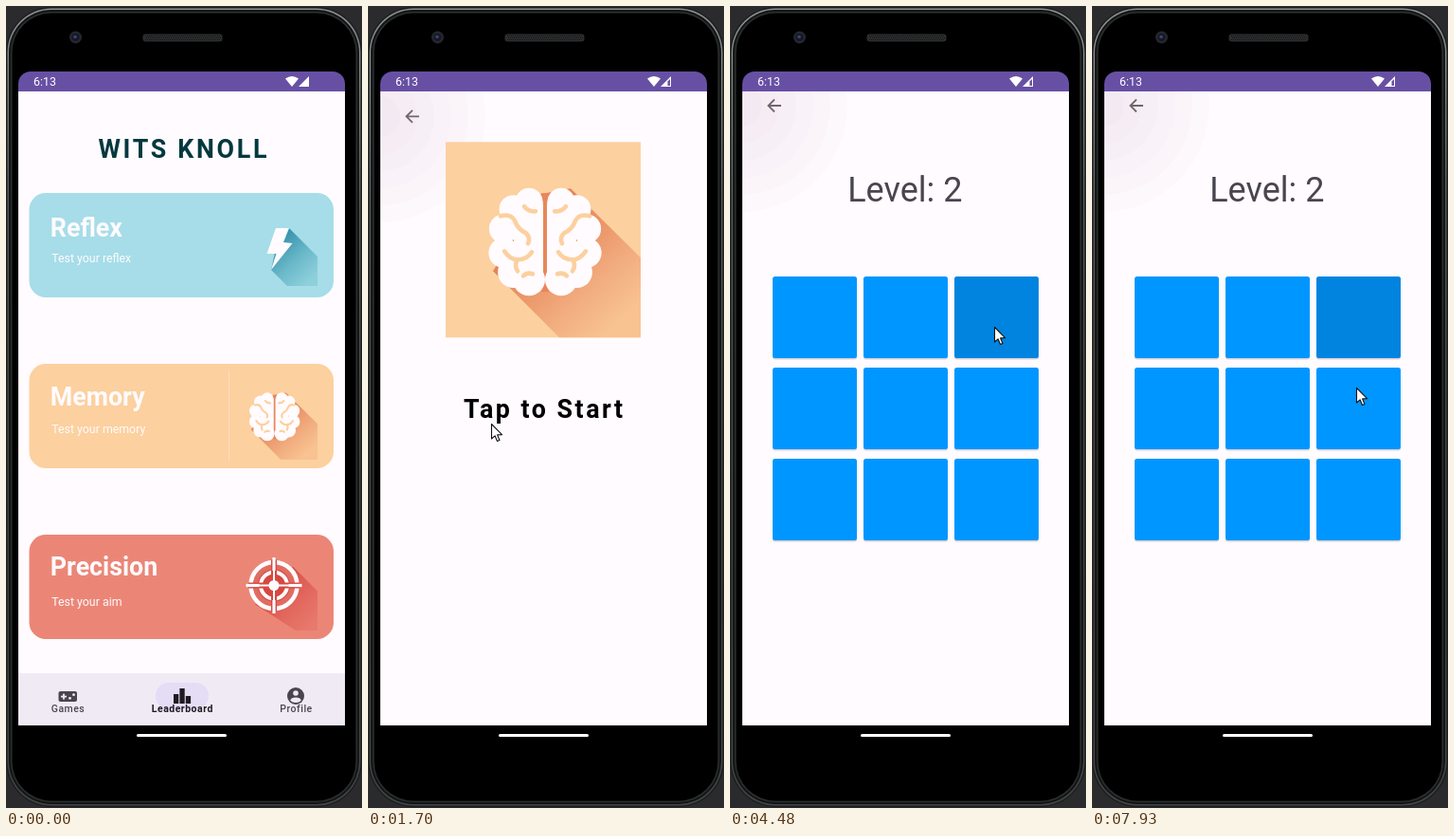
Animation, 376 px wide and 845 px high, one loop 7990 ms. Source, as an HTML page with a canvas:

```html
<!DOCTYPE html>
<html lang="en">
<head>
<meta charset="utf-8">
<title>Memory game demo</title>
<style>
html, body { margin: 0; width: 100%; height: 100%; overflow: hidden; background: #2b2b2d; }
canvas { display: block; width: 376px; height: 845px; }
</style>
</head>
<body>
<canvas id="stage"></canvas>
<script>
const W = 376, H = 845, LOOP = 7990, BEAT = 57;
const canvas = document.getElementById('stage');
const c = canvas.getContext('2d');
const dpr = window.devicePixelRatio || 1;
canvas.width = W * dpr;
canvas.height = H * dpr;

const PAPER = '#fffbfe', GREY = '#49454f', INK = '#1d1b20', PURPLE = '#6750a4', NAV = '#f0eaf5';
const PEACH = '#fcd09f', BLUE = '#0096ff', OLIVE = '#697a21', RED = '#d5483f';

// Pointer paths: each starts where the previous one ended
const START = [37, 494];
const MOVES = [
  { from: 460, to: 620, at: [130, 440] },
  { from: 2175, to: 2340, at: [132, 452] },
  { from: 3715, to: 3770, at: [145, 438] },
  { from: 3770, to: 4120, at: [279, 338] },
  { from: 7750, to: 7930, at: [279, 402] },
];
const FLASHES = [{ from: 2900, to: 3830, tile: 2 }, { from: 5350, to: 6100, tile: 2 }, { from: 6460, to: 7240, tile: 5 }];
const PRESSES = [{ from: 4370, to: 4930 }, { from: 7750, to: LOOP }];

const during = (spans, t) => spans.find(s => t >= s.from && t < s.to);
const clamp = v => Math.min(1, Math.max(0, v));
const easeOut = p => 1 - (1 - p) ** 2;

const held = (t, start) => start + Math.floor((t - start) / 55) * 55;

function stepped(t, { from, to }) {
  const n = Math.round((to - from) / BEAT);
  return Math.floor(clamp((t - from) / (to - from)) * n) / n;
}

function rect(x, y, w, h, r, fill) {
  c.beginPath();
  c.roundRect(x, y, w, h, r);
  c.fillStyle = fill;
  c.fill();
}

function disc(x, y, r, fill) {
  c.beginPath();
  c.arc(x, y, r, 0, 7);
  c.fillStyle = fill;
  c.fill();
}

function ring(x, y, r, width, color) {
  c.beginPath();
  c.arc(x, y, r, 0, 7);
  c.lineWidth = width;
  c.strokeStyle = color;
  c.stroke();
}

function poly(points, fill) {
  c.beginPath();
  points.forEach(p => c.lineTo(p[0], p[1]));
  c.closePath();
  c.fillStyle = fill;
  c.fill();
}

function text(str, x, y, size, weight, color, spacing = 0, align = 'left') {
  c.font = `${weight} ${size}px Roboto, sans-serif`;
  c.letterSpacing = spacing + 'px';
  c.textAlign = align;
  c.fillStyle = color;
  c.fillText(str, x, y);
}

function fade(x0, y0, x1, y1, ...colors) {
  const g = c.createLinearGradient(x0, y0, x1, y1);
  colors.forEach((color, i) => g.addColorStop(i / (colors.length - 1), color));
  return g;
}

function scoped(draw) {
  c.save();
  draw();
  c.restore();
}

function clipped(x, y, w, h, r, draw) {
  scoped(() => {
    c.beginPath();
    c.roundRect(x, y, w, h, r);
    c.clip();
    draw();
  });
}

function shell(inset, color) {
  rect(inset, inset + 1, W - 2 * inset, H - 2 * inset - 2, 48 - inset, color);
}

function phone() {
  c.fillStyle = '#2b2b2d';
  c.fillRect(0, 0, W, H);
  shell(0, '#1c1e1e');
  shell(1.5, fade(0, 0, 0, H, '#8e9393', '#525657', '#424546', '#3a3d3e', '#424647'));
  shell(3, '#141616');
  shell(5, '#2c2f2f');
  shell(6.5, '#000');
  disc(73.5, 33, 6.5, '#25272b');
  disc(73.5, 33, 4, '#15182a');
  disc(73, 32.5, 1.8, '#3a466e');
  rect(144.5, 29.5, 84, 8, 3, '#2c2d2e');
  c.fillStyle = '#121313';
  for (let i = 0; i < 40; i++)
    for (let j = 0; j < 3; j++) c.fillRect(147 + i * 2 + j % 2, 31 + j * 2, 1, 1);
  rect(138, 767, 95, 3, 1.5, '#fff');
}

function statusBar(t) {
  c.fillStyle = PURPLE;
  c.fillRect(13, 69, 345, 21);
  text('6:13', 29, 84.2, 12.4, 400, '#fff');
  c.beginPath();
  c.moveTo(302, 85);
  c.lineTo(295, 76.5);
  c.quadraticCurveTo(302, 71.5, 309, 76.5);
  c.fillStyle = '#fff';
  c.fill();
  poly([[320, 74], [320, 85], [309, 85]], '#fff');
  if (t >= 1700) poly([[319, 77], [319, 84], [316.5, 84], [316.5, 79.5]], PURPLE);
}

function bolt() {
  poly([[299, 234], [329, 264], [329, 295], [297, 295], [280, 278], [285, 255]],
    fade(287, 250, 322, 288, '#3c96af', '#6ab8c9', '#8dcfdb'));
  poly([[285, 234], [299, 234], [293, 249], [302.5, 250], [280, 278], [285.5, 261], [275.5, 261]], PAPER);
}

function hemisphere() {
  for (let i = 0; i < 6; i++) {
    const a = -Math.PI * (0.5 + i / 5);
    disc(88 + 28 * Math.cos(a), 104 + 41 * Math.sin(a), 14.5 + i / 2, PAPER);
  }
  rect(72, 52, 31, 109, 15, PAPER);
  c.strokeStyle = PEACH;
  c.lineWidth = 4.6;
  c.lineCap = 'round';
  c.stroke(new Path2D('M58 78q11-3 15 5q3 9 12 13q5 5 2 11M83 68q5 6 12 5M62 115q6 9 14 9q10 0 15-8M76 124q-4 6 0 12M82 141q4-4 10-2'));
}

// Brain picture on a 206-unit square
function brain(x, y, size) {
  scoped(() => {
    c.translate(x, y);
    c.scale(size / 206, size / 206);
    c.fillStyle = PEACH;
    c.fillRect(0, 0, 206, 206);
    poly([[132, 49], [206, 122], [206, 206], [120, 206], [50, 136], [100, 55]],
      fade(100, 90, 186, 186, '#e58458', '#eb9669', '#f2ae80', '#f8c291'));
    c.fillStyle = '#e8875b';
    c.fillRect(101, 54, 8, 104);
    hemisphere();
    c.translate(210, 0);
    c.scale(-1, 1);
    hemisphere();
  });
}

function target() {
  scoped(() => {
    c.translate(283, 610.5);
    poly([[20, -20], [46, 6], [46, 47.5], [23, 47.5], [-20, 20]],
      fade(2, 2, 42, 42, '#d9524a', '#e2685d', '#e87a6c'));
    disc(0, 0, 24, '#e06c60');
    ring(0, 0, 24.5, 4.5, PAPER);
    disc(0, 0, 17, RED);
    ring(0, 0, 14, 4, PAPER);
    disc(0, 0, 5.5, PAPER);
    for (let i = 0; i < 4; i++) {
      c.rotate(Math.PI / 2);
      c.fillStyle = RED;
      c.fillRect(-3, -27, 6, 16);
      c.fillStyle = PAPER;
      c.fillRect(-1.6, -29.5, 3.2, 14);
      c.fillRect(-1, -16, 2, 13);
    }
  });
}

function navBar() {
  c.fillStyle = NAV;
  c.fillRect(0, 703, W, 55);
  rect(158, 713, 56, 28, 14, '#e5dcf6');
  rect(55.5, 722, 19.5, 11, 2, GREY);
  c.fillStyle = NAV;
  c.fillRect(58, 726.7, 6, 1.8);
  c.fillRect(60.1, 724.6, 1.8, 6);
  disc(67.5, 729.3, 1.4, NAV);
  disc(71.5, 725.7, 1.4, NAV);
  c.fillStyle = INK;
  [10, 16, 8].forEach((h, i) => c.fillRect(177 + i * 6.4, 735 - h, 5.3, h));
  disc(306, 727, 9, GREY);
  disc(306, 724, 2.8, NAV);
  c.beginPath();
  c.ellipse(306, 731.2, 5.5, 2.8, 0, 0, 7);
  c.fill();
  text('Games', 65.5, 744, 10.5, 500, GREY, 0.5, 'center');
  text('Leaderboard', 186.3, 744, 10.5, 700, INK, 0.5, 'center');
  text('Profile', 306.5, 744, 10.5, 500, GREY, 0.5, 'center');
}

function card(y, color, name, nameY, about, aboutY) {
  rect(24.5, y, 321.5, 110, 17.5, color);
  text(name, 46.8, nameY, 26.8, 700, PAPER);
  text(about, 48.3, aboutY, 12.35, 400, PAPER);
}

function homePage(t) {
  c.fillStyle = PAPER;
  c.fillRect(0, 90, W + 40, 668);
  text('WITS KNOLL', 187.8, 159.8, 26.8, 700, '#04383f', 2.68, 'center');
  card(197, '#a6dde8', 'Reflex', 243, 'Test your reflex', 270);
  bolt();
  card(377, PEACH, 'Memory', 421, 'Test your memory', 450);
  brain(236.5, 385.5, 92.5);
  if (t < 1060) {
    c.fillStyle = 'rgba(255,255,255,.35)';
    c.fillRect(235, 385, 1, 94);
  }
  if (t >= 830) clipped(24.5, 377, 321.5, 110, 17.5, () =>
    disc(130, 440, 40 + (held(t, 830) - 830) * 0.9, 'rgba(255,255,255,.14)'));
  card(557, '#eb8677', 'Precision', 600, 'Test your aim', 632);
  target();
  navBar();
}

// Pale rings and back arrow in the corner
function corner(y) {
  for (let r = 112; r > 20; r -= 18) disc(12, y, r, 'rgba(80,60,80,.011)');
  c.strokeStyle = '#6f686c';
  c.lineWidth = 1.8;
  c.lineCap = 'butt';
  c.stroke(new Path2D(`M54 ${y}H41M47 ${y - 6.5}l-6.5 6.5l6.5 6.5`));
}

function startPage() {
  c.fillStyle = PAPER;
  c.fillRect(0, 90, W, 668);
  corner(116.3);
  brain(82, 143.3, 206);
  text('Tap to Start', 186.3, 434, 26.8, 700, '#000', 2.5, 'center');
}

function gamePage(t) {
  c.fillStyle = PAPER;
  c.fillRect(0, 90, W, 668);
  corner(105);
  text('Level: ' + (t < 4430 ? 1 : 2), 124.2, 206, 36, 400, GREY);
  const flash = during(FLASHES, t);
  const press = during(PRESSES, t);
  for (let i = 0; i < 9; i++) {
    const x = 45 + i % 3 * 96, y = 285 + Math.floor(i / 3) * 96;
    rect(x, y + 1.5, 89, 86, 2.5, 'rgba(40,40,60,.2)');
    rect(x, y, 89, 86, 2.5, flash && flash.tile === i ? OLIVE : BLUE);
  }
  if (press) clipped(237, 285, 89, 86, 2.5, () =>
    disc(280, 333, 28 + (held(t, press.from) - press.from) * 0.5, 'rgba(0,0,0,.12)'));
}

function pointer(t) {
  if (t < MOVES[0].from) return;
  let [x, y] = START;
  for (const move of MOVES) {
    const p = easeOut(stepped(t, move));
    x += (move.at[0] - x) * p;
    y += (move.at[1] - y) * p;
  }
  scoped(() => {
    c.translate(Math.round(x) + 0.5, Math.round(y) + 0.5);
    c.lineJoin = 'round';
    poly([[0, 0], [0, 15.5], [3.6, 12.3], [6, 18], [8.5, 17], [6.1, 11.4], [11, 11.1]], '#fff');
    c.lineWidth = 1.1;
    c.strokeStyle = '#111';
    c.stroke();
  });
}

function slid(x, alpha, draw) {
  scoped(() => {
    c.translate(x, 0);
    c.globalAlpha = alpha;
    draw();
  });
}

function pages(t) {
  const s = held(t, 1035);
  if (t < 1200) slid(-4 * Math.max(0, (s - 1035) / 55) ** 2.5, 1, () => homePage(t));
  if (s >= 1145 && t < 1930) slid(4 * Math.exp((1200 - s) / 65), t < 1200 ? 0.7 : 1, startPage);
  if (t >= 1930) gamePage(t);
}

function render(t) {
  c.setTransform(dpr, 0, 0, dpr, 0, 0);
  phone();
  clipped(13, 69, 345, 689, [13, 13, 0, 0], () => {
    pages(t);
    statusBar(t);
  });
  pointer(t);
}

const begin = performance.now();
function loop() {
  render(Math.max(0, performance.now() - begin) % LOOP);
  requestAnimationFrame(loop);
}
loop();
</script>
</body>
</html>
```
